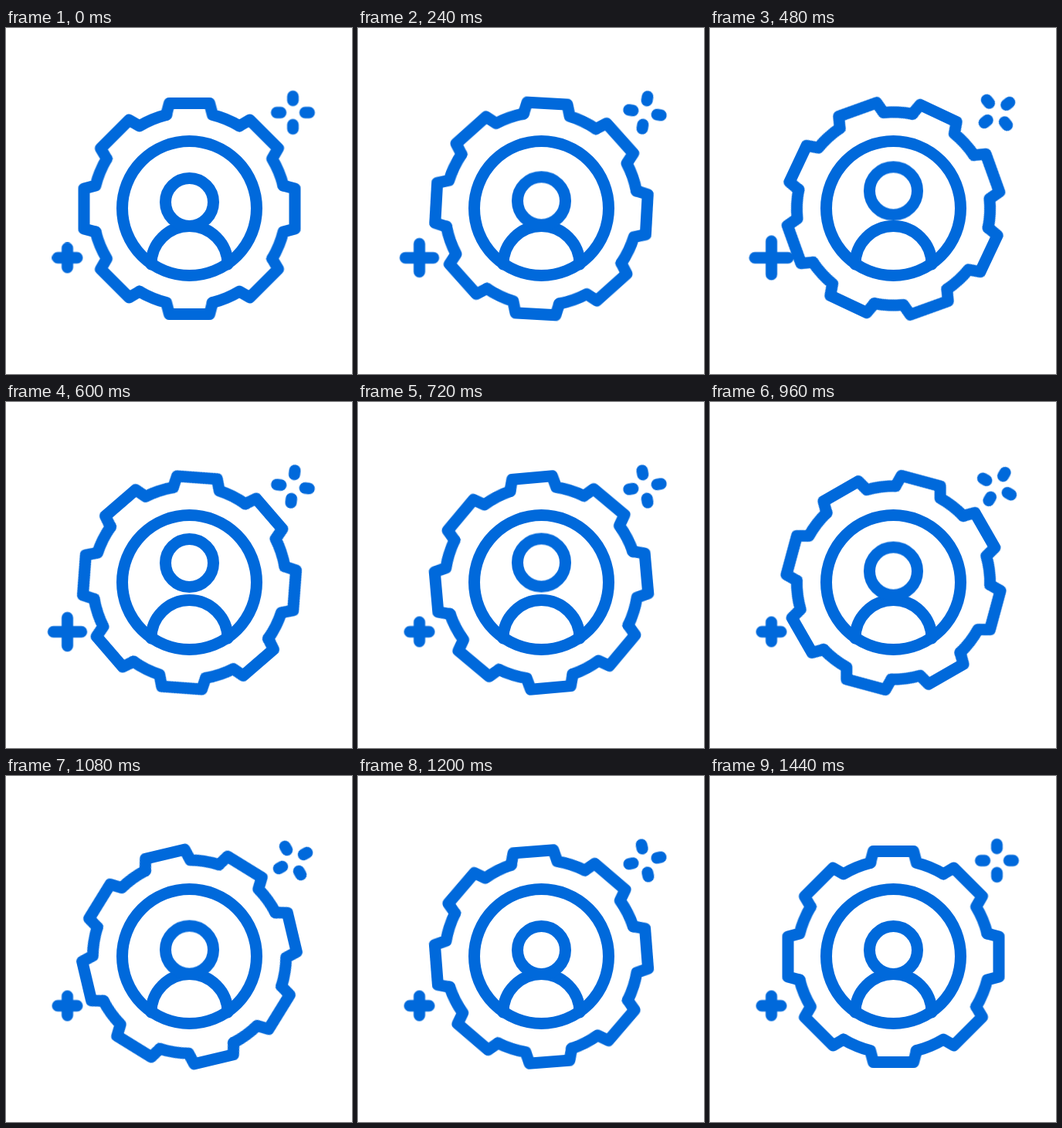
An HTML page without scripts for the animation above (1.5 s loop, 448 px wide and 448 px high).

```html
<!DOCTYPE html>
<html lang="en">
<head>
<meta charset="utf-8">
<title>Profile settings</title>
<style>
  html, body { margin: 0; width: 100%; height: 100%; overflow: hidden; background: #fff; }
  svg { display: block; width: 100%; height: 100%; }

  .icon { fill: none; stroke: #0069db; stroke-width: 15; stroke-linecap: round; stroke-linejoin: round; }
  .icon .gear, .icon .spark, .icon .head, .icon .plus {
    animation: 1500ms cubic-bezier(.65, 0, .35, 1) infinite;
  }
  .icon .gear { animation-name: half-turn; }
  .icon .spark { animation-name: full-turn; }
  .icon .head { animation-name: nod; }
  .icon .plus { animation-name: grow; vector-effect: non-scaling-stroke; }

  /* cubic ease in, then cubic ease out */
  @keyframes half-turn {
    0% { transform: rotate(0); animation-timing-function: cubic-bezier(.333, 0, .667, 0); }
    49% { transform: rotate(90deg); animation-timing-function: cubic-bezier(.333, 1, .667, 1); }
    98%, 100% { transform: rotate(180deg); }
  }
  @keyframes full-turn {
    98%, 100% { transform: rotate(360deg); }
  }
  @keyframes nod {
    0%, 4% { transform: none; }
    47%, 49% { transform: translateY(-17.5px); }
    76.5%, 100% { transform: none; }
  }
  @keyframes grow {
    29.4%, 32.7% { transform: scale(1.72); }
    49%, 100% { transform: none; }
  }
</style>
</head>
<body>
<svg viewBox="0 0 448 448">
  <defs>
    <!-- one tooth and the rim up to the next -->
    <path id="tooth" d="M-30-121.5L-26-136.5H26L30-121.5A125.1 125.1 0 0 1 64.7-107.1"/>
    <g id="quarter">
      <use href="#tooth"/>
      <use href="#tooth" transform="rotate(45)"/>
    </g>
    <path id="dash" d="M0-21V-15.8"/>
  </defs>
  <g class="icon">
    <g transform="translate(237.5 234)">
      <g class="gear">
        <use href="#quarter"/>
        <use href="#quarter" transform="rotate(90)"/>
        <use href="#quarter" transform="rotate(180)"/>
        <use href="#quarter" transform="rotate(270)"/>
      </g>
    </g>
    <circle cx="237.5" cy="233.5" r="87"/>
    <path d="M188 306A49.5 49.5 0 0 1 287 306"/>
    <circle class="head" cx="237.5" cy="225.5" r="31"/>
    <g transform="translate(371.5 109.5)">
      <g class="spark">
        <use href="#dash"/>
        <use href="#dash" transform="rotate(90)"/>
        <use href="#dash" transform="rotate(180)"/>
        <use href="#dash" transform="rotate(270)"/>
      </g>
    </g>
    <g transform="translate(79.5 297.5)">
      <path class="plus" d="M-12.5 0H12.5M0-12.5V12.5"/>
    </g>
  </g>
</svg>
</body>
</html>
```
